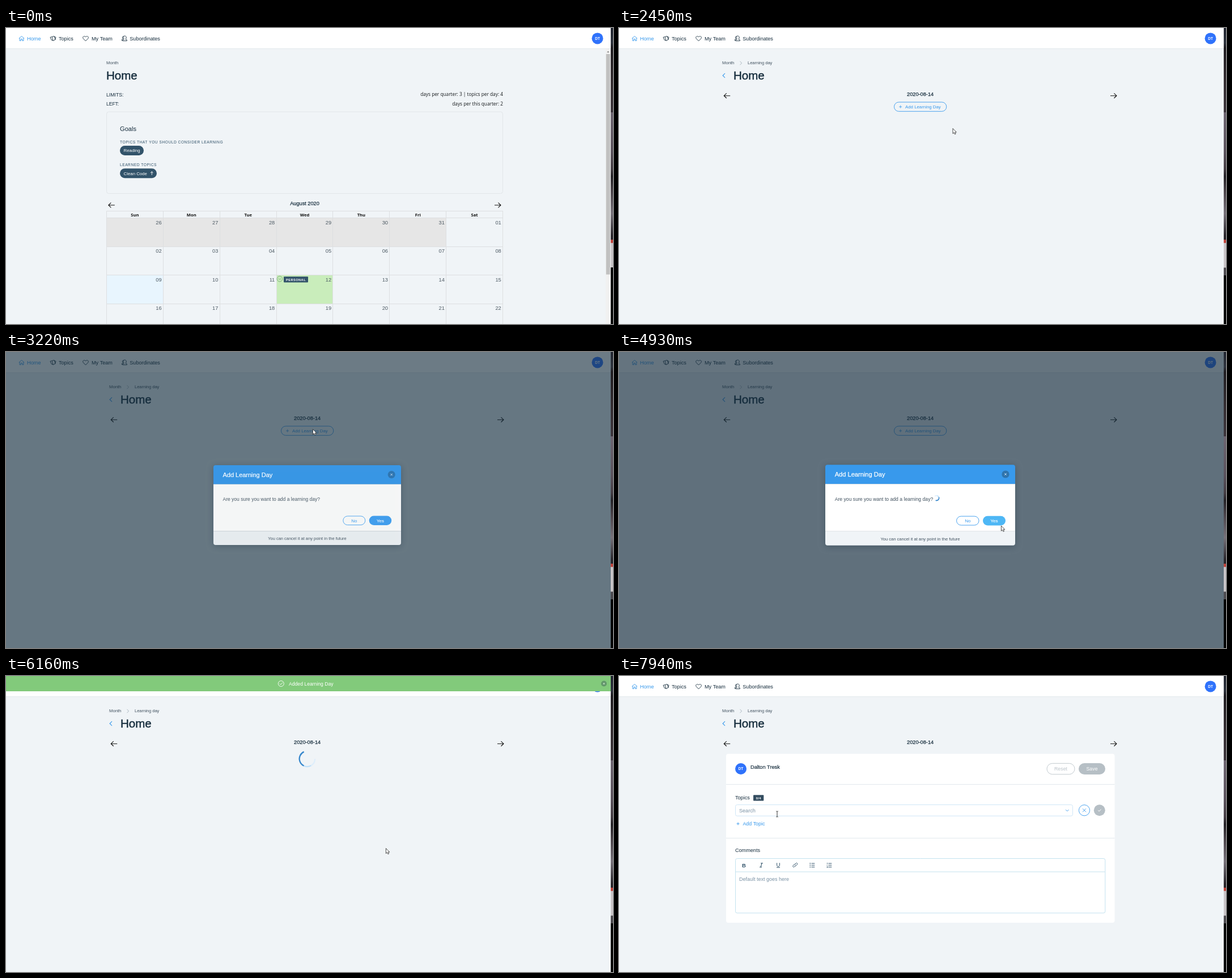
These frames come from a looping animation (1071 px wide and 523 px high, 8000 ms). An HTML page with a canvas:

```html
<!DOCTYPE html>
<html lang="en">
<head>
<meta charset="utf-8">
<title>Learning day</title>
<style>
html, body { margin: 0; width: 100%; height: 100%; overflow: hidden; background: #f0f4f7; }
canvas { display: block; }
</style>
</head>
<body>
<canvas id="stage" width="1071" height="523"></canvas>
<script>
const ctx = document.getElementById('stage').getContext('2d');
const LOOP = 8000, W = 1067, H = 523;
const SANS = '"Liberation Sans", Arial, sans-serif';
const OPEN = '"Open Sans", "Noto Sans", sans-serif';
const BLUE = '#3899ec', INK = '#162d3d', SOFT = '#40515f', SLATE = '#32536a', BG = '#f0f4f7', GREY = '#b6bfc5';

const clamp = v => Math.max(0, Math.min(1, v));
const ramp = (t, start, len) => clamp((t - start) / len);
const smooth = p => p * p * (3 - 2 * p);
const easeOut = p => 1 - (1 - p) ** 3;

function text(str, x, y, size, color, o = {}) {
  ctx.font = `${o.weight || 400} ${size}px ${o.font || SANS}`;
  ctx.textAlign = o.align || 'left';
  ctx.letterSpacing = (o.spacing || 0) + 'px';
  ctx.fillStyle = color;
  ctx.fillText(str, x, y);
  if (o.heavy) {
    ctx.strokeStyle = color;
    ctx.lineWidth = o.heavy;
    ctx.strokeText(str, x, y);
  }
  ctx.letterSpacing = '0px';
}

function rect(x, y, w, h, color) {
  ctx.fillStyle = color;
  ctx.fillRect(x, y, w, h);
}

function paint(fill, stroke, width = 1) {
  if (fill) { ctx.fillStyle = fill; ctx.fill(); }
  if (stroke) { ctx.strokeStyle = stroke; ctx.lineWidth = width; ctx.stroke(); }
}

function box(x, y, w, h, r, fill, stroke, width) {
  ctx.beginPath();
  ctx.roundRect(x, y, w, h, r);
  paint(fill, stroke, width);
}

function circle(x, y, r, fill, stroke, width) {
  ctx.beginPath();
  ctx.arc(x, y, r, 0, 7);
  paint(fill, stroke, width);
}

function icon(d, x, y, stroke, width = 1, fill) {
  ctx.save();
  ctx.translate(x, y);
  const path = new Path2D(d);
  if (fill) { ctx.fillStyle = fill; ctx.fill(path); }
  ctx.strokeStyle = stroke;
  ctx.lineWidth = width;
  ctx.stroke(path);
  ctx.restore();
}

const PLUS = 'M-2.5 0H2.5M0 -2.5V2.5';
const CHECK = 'M-2.5 0L-.7 1.8L2.7 -1.8';
const cross = s => `M${-s} ${-s}L${s} ${s}M${s} ${-s}L${-s} ${s}`;
const arrow = dir => `M${-5.5 * dir} 0H${5.5 * dir}M${dir} -4.3L${5.5 * dir} 0L${dir} 4.3`;

function avatar(x, y) {
  circle(x, y, 10, '#2f72fb');
  text('DT', x, y + 2.3, 6.6, '#fff', { align: 'center', weight: 700 });
}

function spinner(x, y, r, width, deg) {
  const rad = Math.PI / 180;
  const arc = (from, to, color) => {
    ctx.beginPath();
    ctx.arc(x, y, r, (deg + from) * rad, (deg + to) * rad);
    paint(null, color, width);
  };
  arc(-245, -185, '#deeefb');
  arc(-185, -130, '#bfe0fa');
  arc(-130, 0, '#3787cc');
}

function header() {
  rect(0, 0, W, 36, '#fff');
  rect(0, 36, W, 1, '#e3e8ec');
  icon('M-4.7 0L0 -4L4.7 0M-3.4 -.8V4H-1.2V1H1.2V4H3.4V-.8', 27.5, 18.5, BLUE, .9);
  icon('M-2 -3L2 -4L4 2L0 4ZM-2.5 -3L-5 -2L-2.5 3L0 3.5M2 -3.5L5 -2L3.5 2.5', 83, 18.5, INK, .9);
  icon('M0 4.5L-4.2 .2C-6.4 -2.4 -2.5 -6 0 -2.5C2.5 -6 6.4 -2.4 4.2 .2Z', 140.5, 18.5, INK, .9);
  icon('M-2 -1.5C-2 -5.5 3.2 -5.5 3.2 -1.5C3.2 0 2.4 1 1.8 1.3L4.3 2.6V4.2H-3V2.6L-.6 1.3C-1.4 .8 -2 0 -2 -1.5ZM-1.2 -4C-4 -4 -4.2 -.5 -2.5 .6L-4.6 2V3.6H-3', 209, 18.5, INK, .9);
  text('Home', 37, 22, 9.2, BLUE);
  text('Topics', 93, 22, 9.1, INK);
  text('My Team', 151, 22, 9.1, INK);
  text('Subordinates', 218.3, 22, 9.1, INK);
  avatar(1043.6, 18.4);
}

// sliver of the desktop behind the window
function edge(t) {
  const g = ctx.createLinearGradient(0, 0, 0, 437);
  const stops = [[0, '#20242f'], [.06, '#2e333d'], [.08, '#1f1c20'], [.22, '#332c30'], [.34, '#3c353b'],
    [.342, '#6d6571'], [.5, '#5a525c'], [.57, '#443d43'], [.6, '#242226'], [.66, '#4b444a'],
    [.75, '#77727a'], [.84, '#29262b'], [.856, '#29262b'], [.857, '#c0443c'], [.868, '#c0443c'],
    [.87, '#c9c5c8'], [.968, '#c9c5c8'], [.97, '#4d4b50'], [1, '#4d4b50']];
  stops.forEach(([at, color]) => g.addColorStop(at, color));
  rect(W, 0, 4, H, '#000');
  rect(W, 0, 4, 437, g);
  if (t < 1760) rect(W, 423, 4, 100, '#050505');
}

function pill(label, y, w) {
  box(201, y, w, 17, 8.5, SLATE);
  text(label, 207.6, y + 11.3, 7.8, '#fff');
}

function calendar() {
  const x0 = 177.5, cw = 99.86, y0 = 335.5, rh = 50.5, line = '#dddfe1';
  text('Month', 177, 64.4, 7.7, SOFT);
  text('Home', 177, 91, 20.5, INK, { heavy: .45 });
  text('LIMITS:', 177, 120.5, 8.7, INK);
  text('LEFT:', 177, 137.2, 8.5, INK);
  text('days per quarter: 3 | topics per day: 4', 877, 120, 8.3, '#15191c', { font: OPEN, align: 'right' });
  text('days per this quarter: 2', 877, 136.6, 8.3, '#15191c', { font: OPEN, align: 'right' });

  box(177.5, 148, 699, 144.5, 4, null, '#e2e6e9');
  text('Goals', 201, 182, 11.1, INK);
  text('TOPICS THAT YOU SHOULD CONSIDER LEARNING', 201, 203.6, 6.7, SLATE, { spacing: .48 });
  pill('Reading', 208, 42);
  text('LEARNED TOPICS', 201, 243.6, 6.7, SLATE, { spacing: .48 });
  pill('Clean Code', 248.3, 65);
  icon('M0 3V-3M-2.4 -.7L0 -3L2.4 -.7', 257.3, 256.8, '#fff', .9);

  icon(arrow(-1), 186.3, 313, '#111', 1.1);
  icon(arrow(1), 867.5, 313, '#111', 1.1);
  text('August 2020', 527, 313.3, 9.2, INK, { align: 'center', heavy: .25 });

  rect(x0, y0, cw * 6, rh, '#e6e6e6');
  rect(x0, y0 + 2 * rh, cw, rh, '#e8f5fe');
  rect(x0 + 3 * cw, y0 + 2 * rh, cw, rh, '#c9edbb');
  for (let i = 0; i < 8; i++) rect(Math.round(x0 + i * cw - .5), 323, 1, 200, line);
  rect(177, 323, 700, 1, line);
  for (let r = 0; r < 4; r++) rect(177, Math.floor(y0 + r * rh), 700, 1, line);
  ['Sun', 'Mon', 'Tue', 'Wed', 'Thu', 'Fri', 'Sat'].forEach((day, i) =>
    text(day, x0 + (i + .5) * cw, 333, 7.6, '#111', { font: OPEN, weight: 700, align: 'center' }));
  for (let i = 0; i < 28; i++) {
    const n = i < 6 ? 26 + i : i - 5;
    text(String(n).padStart(2, '0'), x0 + (i % 7 + 1) * cw - 2.8, 346.5 + Math.floor(i / 7) * rh, 9.3, '#4d5a64', { align: 'right' });
  }
  circle(483, 443.3, 4.8, null, '#75a873', .9);
  icon('M-2.4 .2Q0 1.6 2.4 .2M-1.8 -1.3H-1M1 -1.3H1.8', 483, 443.3, '#75a873', .8);
  box(490, 439.2, 43, 10.4, 1, SLATE);
  text('PERSONAL', 494, 446.6, 5.6, '#fff', { weight: 700, spacing: .5 });

  rect(1058, 37, 9, 486, '#f1f1f1');
  rect(1058.8, 46, 7.2, 389.5, '#c1c1c1');
  icon('M-1.8 1L0 -1L1.8 1Z', 1062.4, 42, '#777', .3, '#777');
}

function dayPage() {
  text('Month', 182, 64.4, 7.7, SOFT);
  icon('M-1.5 -3.2L1.6 0L-1.5 3.2', 215, 62, '#98a6b1', .8);
  text('Learning day', 227, 64.4, 7.5, SOFT);
  icon('M2 -3.8L-1.9 0L2 3.8', 185, 84, BLUE, 1.1);
  text('Home', 202, 91, 20.5, INK, { heavy: .45 });
  icon(arrow(-1), 190.7, 119.7, '#111', 1.1);
  icon(arrow(1), 872.5, 119.7, '#111', 1.1);
  text('2020-08-14', 531.6, 120.2, 9.2, INK, { align: 'center', heavy: .25 });
}

function addButton(hover) {
  const mix = (a, b) => Math.round(a + (b - a) * hover);
  const color = `rgb(${mix(56, 255)},${mix(153, 255)},${mix(236, 255)})`;
  box(485.5, 131, 92.3, 16.3, 8.1, `rgba(56,153,236,${hover})`, BLUE, .9);
  icon(PLUS, 496.7, 139.2, color, .8);
  text('Add Learning Day', 505, 142, 7.85, color);
}

function modal(t) {
  ctx.fillStyle = `rgba(22,45,61,${.66 * ramp(t, 2997, 235)})`;
  ctx.fillRect(0, 0, W, H);
  const p = easeOut(ramp(t, 2992, 375)), s = .8 + .2 * p;
  ctx.save();
  ctx.globalAlpha = p;
  ctx.translate(531.5, 270.5);
  ctx.scale(s, s);
  ctx.translate(-531.5, -270.5);

  // only the shadow lands on the stage
  ctx.save();
  ctx.shadowColor = 'rgba(22,45,61,.35)';
  ctx.shadowBlur = 12;
  ctx.shadowOffsetX = 3000;
  ctx.shadowOffsetY = 2;
  ctx.translate(-3000 / s, 0);
  box(364, 199.2, 335, 142.6, 4, '#000');
  ctx.restore();

  box(364, 199.2, 335, 34, [4, 4, 0, 0], BLUE);
  rect(364, 233.2, 335, 83.6, '#fff');
  box(364, 316.8, 335, 25, [0, 0, 4, 4], BG);
  text('Add Learning Day', 380.7, 220, 11.1, '#fff', { heavy: .25 });
  circle(682, 216, 6.6, '#2f74ad');
  icon(cross(1.8), 682, 216, '#d8e9f8', .9);
  text('Are you sure you want to add a learning day?', 380.7, 263, 8.65, SOFT);
  box(595.6, 290.2, 39.4, 15.8, 7.9, null, BLUE, .9);
  text('No', 615.3, 301.2, 8.1, BLUE, { align: 'center' });
  box(642, 289.8, 40, 16.6, 8.3, t > 3980 ? '#4eb7f5' : BLUE);
  text('Yes', 662, 301.2, 8.1, '#fff', { align: 'center', heavy: .15 });
  text('You can cancel it at any point in the future', 531.5, 332.7, 7.57, SOFT, { align: 'center' });
  if (t >= 4300) spinner(560.2, 258, 4.4, 1.8, 110 + (t - 4930) * .36);
  ctx.restore();
}

function form(open) {
  const dy = open ? 0 : -23;
  box(189, 137.5, 685.5, 298.5 + dy, 4, '#fff');
  avatar(215, 164);
  text('Dalton Tresk', 232, 163.8, 9.2, INK, { heavy: .2 });
  box(755, 154.4, 49, 19.3, 9.7, null, '#bcc4ca', .9);
  text('Reset', 779.5, 167.4, 8.8, '#bcc4ca', { align: 'center' });
  box(811, 154, 47, 20, 10, GREY);
  text('Save', 834.5, 167.4, 8.8, '#fff', { align: 'center' });
  rect(189, 191, 685.5, 1, '#e2e8ed');

  text('Topics', 205, 218, 9.1, INK);
  box(237, 210.3, 18.3, 10.2, 1, '#344d60');
  text('0/4', 246.2, 217.6, 5.8, '#fff', { align: 'center', weight: 700, spacing: .3 });
  if (open) {
    box(205.5, 227.5, 595, 19.8, 3, '#fff', '#cfe7f8');
    text('Search', 212, 240.8, 9.1, '#7a92a5');
    icon('M-2.7 -1.3L0 1.4L2.7 -1.3', 790.8, 237.5, BLUE, .9);
    circle(821, 237.3, 9.6, null, BLUE, .9);
    icon(cross(3), 821, 237.3, BLUE, .9);
    circle(847.8, 237.3, 10, GREY);
    icon(CHECK, 847.8, 237.3, '#fff', 1);
  }
  icon(PLUS, 210, 261 + dy, BLUE, .9);
  text('Add Topic', 218.4, 264.2 + dy, 8.9, BLUE);
  rect(189, 286 + dy, 685.5, 1, '#e2e8ed');

  ctx.save();
  ctx.translate(0, dy);
  text('Comments', 205, 310.5, 9.1, INK);
  box(205.5, 322.5, 652.3, 96.3, 3, null, '#c3e2f0');
  rect(206, 345.5, 651.5, 1, '#c3e2f0');
  text('B', 220.5, 337.8, 9.5, SLATE, { weight: 700, align: 'center' });
  icon('M-1 -3.5H3M-3 3.5H1M1 -3.5L-1 3.5', 251, 334.3, SLATE, 1.1);
  icon('M-2.4 -4V0C-2.4 3 2.4 3 2.4 0V-4M-3 4H3', 281, 334.3, SLATE, 1);
  icon('M-.6 -1.2L1.4 -3.2C3 -4.6 5 -2.4 3.6 -1L1.6 1C.8 1.7 -.3 1.6 -.9 .9M.6 1.2L-1.4 3.2C-3 4.6 -5 2.4 -3.6 1L-1.6 -1C-.8 -1.7 .3 -1.6 .9 -.9', 310.8, 334, SLATE, 1);
  for (const x of [341, 371]) {
    icon('M-1.6 -3.2H4.3M-1.6 0H4.3M-1.6 3.2H4.3', x, 334.3, SLATE, 1);
    const mark = x === 341 ? 'M-4.4 -3.2H-3M-4.4 0H-3M-4.4 3.2H-3' : 'M-3.6 -4.4V-2M-4.4 0H-3M-4.4 2.4H-3V4.2H-4.4';
    icon(mark, x, 334.3, SLATE, x === 341 ? 1.5 : .8);
  }
  text('Default text goes here', 212, 362.2, 9, '#7a92a5');
  ctx.restore();
}

function banner(y) {
  ctx.save();
  ctx.translate(0, y);
  rect(0, 0, W, 27, '#82ca7b');
  circle(485.3, 13.5, 5, null, '#fff', .9);
  icon(CHECK, 485.3, 13.5, '#fff', .9);
  text('Added Learning Day', 499, 16.8, 8.65, '#fff');
  circle(1055, 13.5, 5, '#62976a');
  icon(cross(1.5), 1055, 13.5, '#e4f3e3', .9);
  ctx.restore();
}

const TRAIL = [
  [150, 1015, 469], [450, 922, 390], [990, 922, 390], [1450, 694, 470], [1840, 694, 470],
  [2440, 588.6, 177], [2580, 588.6, 177], [2880, 541, 136], [3420, 541, 136], [4070, 664, 299],
  [4220, 664, 299], [4600, 674, 306.5], [5050, 674, 306.5], [5400, 670, 304], [6470, 670, 304],
  [7240, 246, 238], [7640, 246, 238], [7900, 279, 244], [8000, 279, 244]];

function cursor(t) {
  const i = TRAIL.findIndex(k => k[0] > t);
  if (i < 1) return;
  const [t0, x0, y0] = TRAIL[i - 1], [t1, x1, y1] = TRAIL[i];
  const p = smooth((t - t0) / (t1 - t0));
  const x = x0 + (x1 - x0) * p, y = y0 + (y1 - y0) * p;
  if (t >= 7640) icon('M-1.8 -5H-.5L0 -4.5L.5 -5H1.8M0 -4.5V4.5M-1.8 5H-.5L0 4.5L.5 5H1.8', x, y, '#222', .9);
  else icon('M.4 .5V9.6L2.5 7.7L4 10.8L5.6 10L4.2 7.1H6.8Z', x, y, '#222', .8, '#fff');
}

function draw(t) {
  rect(0, 0, W, H, BG);
  header();
  if (t < 1840) calendar();
  else {
    dayPage();
    const loading = t < 2220 || (t >= 5000 && t < 6240);
    if (loading) spinner(531.4, 146.3, 13.7, 2.3, 245 + (t - 6160) * .36);
    else if (t < 5000) addButton(ramp(t, 2800, 80) * (1 - .35 * ramp(t, 3060, 80) - .65 * ramp(t, 3140, 75)));
    else form(t >= 7620);
  }
  if (t >= 2992 && t < 5000) modal(t);
  if (t >= 5000 && t < 6900) banner(-27 * smooth(ramp(t, 6700, 200)));
  edge(t);
  cursor(t);
}

function tick() {
  draw(performance.now() % LOOP);
  requestAnimationFrame(tick);
}
tick();
</script>
</body>
</html>
```
